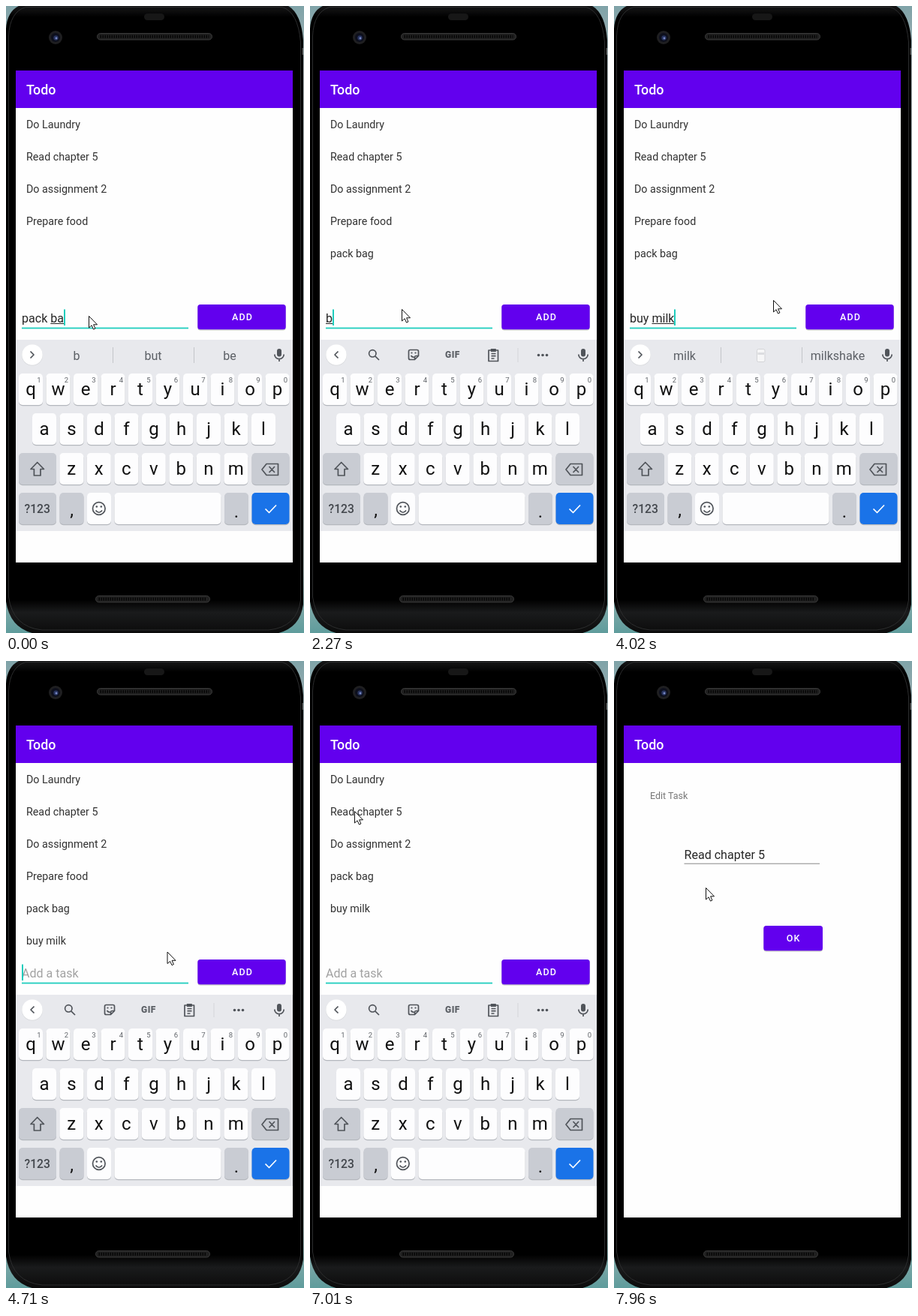
An HTML page that plays this animation: 397x836 px, repeating every 8000 ms.

```html
<!DOCTYPE html>
<html lang="en">
<head>
<meta charset="utf-8">
<title>Todo list</title>
<style>
  html, body { margin: 0; width: 100%; height: 100%; overflow: hidden; background: #000; }
  svg { display: block; width: 100%; height: 100%; }
  text { font-family: Roboto, sans-serif; white-space: pre; }
  .item { font-size: 14.29px; fill: #323232; }
  .input { font-size: 16.07px; fill: #262626; }
  .button { font-size: 12.5px; font-weight: 500; letter-spacing: 1.12px; fill: #fff; }
  .key { font-size: 24px; fill: #111; text-anchor: middle; }
  .digit { font-size: 9.5px; fill: #5f6368; text-anchor: middle; }
  .word { font-size: 16.07px; fill: #5c6066; text-anchor: middle; }
  .icon { fill: none; stroke: #50545a; stroke-width: 1.7; stroke-linejoin: round; }
</style>
</head>
<body>
<svg id="stage" viewBox="0 0 397 836" preserveAspectRatio="none"></svg>
<script>
const LOOP = 8000;
const PURPLE = '#6200ee', TEAL = '#1fcdbd', KEY = '#fdfdfe', GREY_KEY = '#c9ccd3';

const rect = (x, y, w, h, fill, more = '') =>
  `<rect x="${x}" y="${y}" width="${w}" height="${h}" fill="${fill}" ${more}/>`;
const text = (x, y, cls, str, more = '') => `<text x="${x}" y="${y}" class="${cls}" ${more}>${str}</text>`;
const icon = (d, more = '') => `<path class="icon" d="${d}" ${more}/>`;
const dot = (x, y, r, fill, more = '') => `<circle cx="${x}" cy="${y}" r="${r}" fill="${fill}" ${more}/>`;

const keyCap = (x, y, w, fill = KEY) =>
  rect(x, y + 1.2, w, 42, '#b4b7bd', 'rx="5"') + rect(x, y, w, 42, fill, 'rx="5"');

const letterRow = (letters, cx, y, digits) => [...letters].map((c, i) => {
  const x = cx + 36.5 * i;
  return keyCap(x - 16, y, 32) + text(x, y + 28.5, 'key', c) +
    (digits ? text(x + 11, y + 11.5, 'digit', (i + 1) % 10) : '');
}).join('');

const grille = (x, y, w) =>
  rect(x, y, w, 8.5, '#202020', 'rx="4.2" stroke="#3b3b3b"') +
  `<path d="M${x + 4} ${y + 4.2}H${x + w - 4}" stroke="#050505" stroke-width="4" stroke-dasharray="1.5 1.5"/>`;

const phone = () => `
  ${rect(0, 0, 397, 836, 'url(#backdrop)')}
  <path d="M0 30Q2 4 22 -2H372Q393 6 396 46V798Q391 834 352 838H46Q6 834 0 794Z" fill="url(#body)"/>
  <path d="M3.500 40Q5 8 26 1.500H368Q389 8 392.500 48V792Q388 828 350 832H48Q9 828 3.500 788Z"
    fill="none" stroke="#2c2d2e"/>
  ${rect(394.5, 56, 1.5, 9, '#555')}
  ${rect(184, 10, 27, 9, '#171717', 'rx="4.500"')}
  ${dot(66, 42, 9, '#1f1f21')}${dot(66, 42, 6, '#0d0f1c')}${dot(66.5, 42.5, 3.2, '#28345f')}${dot(67, 43, 1.4, '#7888c4')}
  ${grille(121.5, 36.5, 153)}${grille(119.5, 786.5, 152)}
  ${rect(13, 86, 369, 656, '#fefefe')}`;

const appBar = () => rect(13, 86, 369, 50, PURPLE) +
  text(27, 117.7, 'title', 'Todo', 'fill="#fff" font-size="17.86" font-weight="500"');

const mic = () => `<rect x="361" y="457" width="6" height="10.500" rx="3" fill="#50545a"/>` +
  icon('M357.800 464.500a6.200 6.200 0 0 0 12.400 0M364 470.500V474');

const toolbar = () => `
  ${icon('M37.500 460.500L33 465L37.500 469.500')}
  <circle class="icon" cx="83.300" cy="463.300" r="4.700"/>${icon('M86.800 466.800L92 472', 'stroke-width="2.100"')}
  ${icon('M139.500 471.500H133.500Q131.500 471.500 131.500 469.500V460.500Q131.500 458.500 133.500 458.500H142.500Q144.500 458.500 144.500 460.500V466.500ZM139.500 471.500V468.500Q139.500 466.500 141.500 466.500H144.500M134.500 466Q136 468.500 138.500 468')}
  ${dot(135.5, 462.5, 1.1, '#50545a')}${dot(140.5, 462.5, 1.1, '#50545a')}
  ${text(190, 469.3, 'word', 'GIF', 'style="font-size:12px;font-weight:900;letter-spacing:.5px"')}
  ${icon('M238 459H250.500V473.500H238ZM241.500 463.500H247.500M241.500 466.700H247.500M241.500 470H245.500')}
  ${rect(240.8, 457, 7, 4, '#50545a')}
  ${rect(276.5, 456, 1, 19, '#d3d5d9')}
  ${[304.5, 310, 315.5].map(x => dot(x, 465.5, 1.8, '#50545a')).join('')}`;

const suggestions = () => `
  ${icon('M32.500 460.500L37 465L32.500 469.500')}
  ${rect(142, 455, 1, 21, '#c3c5c9')}${rect(250, 455, 1, 21, '#c3c5c9')}
  ${[94, 196, 298].map((x, i) => text(x, 471.5, 'word', '', `id="word${i}"`)).join('')}
  <g id="glass">${rect(190.5, 457.5, 10.5, 17, '#f6f6f7', 'rx="2" stroke="#d3d4d7"')}
  ${rect(191.5, 462, 8.5, 3, '#dcdde0')}</g>`;

const keyboard = () => `
  ${rect(13, 445, 369, 255, '#e8e9ed')}
  ${dot(35, 465.6, 14, '#d5d7da')}${dot(35, 465, 13.7, '#fff')}
  <g id="toolbar">${toolbar()}</g><g id="suggestions">${suggestions()}</g>${mic()}
  ${letterRow('qwertyuiop', 33, 490, true)}
  ${letterRow('asdfghjkl', 51, 543)}
  ${letterRow('zxcvbnm', 87.3, 596)}
  ${keyCap(17, 596, 50, GREY_KEY)}${icon('M41.700 608.500L50.500 617.500H46V626H37.400V617.500H33Z')}
  ${keyCap(327.5, 596, 50, GREY_KEY)}
  ${icon('M341 618L347 610.500H362.500V625.500H347ZM350.500 614L358 622M358 614L350.500 622')}
  ${keyCap(17, 649, 50, GREY_KEY)}
  ${text(41.7, 675.7, 'key', '?123', 'style="font-size:15.700px;font-weight:500;fill:#44484e"')}
  ${keyCap(71.5, 649, 32, GREY_KEY)}${text(87.5, 680, 'key', ',')}
  ${keyCap(108, 649, 32)}
  <circle class="icon" cx="123.800" cy="670" r="8.300"/>${icon('M119.500 672.500Q123.800 678 128.100 672.500')}
  ${dot(120.8, 667.5, 1.3, '#50545a')}${dot(126.8, 667.5, 1.3, '#50545a')}
  ${keyCap(144.5, 649, 142)}
  ${keyCap(291, 649, 32, GREY_KEY)}${text(307, 682, 'key', '.')}
  ${keyCap(327.5, 649, 50, '#1a73e8')}${icon('M345.500 670.500L350.500 675.500L360 665.500', 'style="stroke:#fff"')}`;

const button = (x, y, w, label, tx, inner = '') =>
  rect(x, y + 1, w, 33.5, '#000', 'rx="3.500" opacity=".22"') +
  rect(x, y, w, 33.3, PURPLE, 'rx="3.500"') + inner + text(tx, y + 21.4, 'button', label);

const listPage = () => `
  ${[0, 1, 2, 3, 4, 5].map(i => text(27, 163 + 43 * i, 'item', '', `id="item${i}"`)).join('')}
  ${rect(21, 428.6, 222, 1.8, TEAL)}
  ${text(21, 421.7, 'input', '', 'id="field"')}
  <rect id="compose" y="423" height="1" fill="#262626"/>
  <rect id="caret" y="404.500" width="2" height="21.500" fill="${TEAL}"/>
  <rect id="lift" x="255" y="399" width="118" height="34" rx="4" fill="#000" opacity=".35" filter="url(#soft)"/>
  ${button(255.3, 398, 117.4, 'ADD', 301,
    '<circle id="ripple" cx="271" cy="414" r="100" fill="#8a3bf0" clip-path="url(#addClip)"/>')}
  ${keyboard()}`;

const editPage = () => rect(13, 136, 369, 606, '#fefefe') +
  text(48, 184, 'label', 'Edit Task', 'font-size="12.500" fill="#777"') +
  text(93.5, 264, 'input', 'Read chapter 5') + rect(93.5, 269.7, 180.5, 1, '#888') +
  button(199.3, 353, 78.7, 'OK', 229.7);

document.getElementById('stage').innerHTML = `
  <defs>
    <linearGradient id="backdrop" x2="0" y2="1">
      <stop stop-color="#7fa3a8"/><stop offset=".1" stop-color="#a9b2b5"/>
      <stop offset=".9" stop-color="#a9b8b8"/><stop offset="1" stop-color="#5f9c9c"/>
    </linearGradient>
    <linearGradient id="body" x2="0" y2="1">
      <stop stop-color="#1b1b1c"/><stop offset=".02" stop-color="#000"/>
      <stop offset=".945" stop-color="#000"/><stop offset=".965" stop-color="#1a1b1c"/><stop offset="1" stop-color="#0a0a0a"/>
    </linearGradient>
    <filter id="soft" x="-10%" y="-30%" width="120%" height="160%"><feGaussianBlur stdDeviation="2"/></filter>
    <clipPath id="addClip"><rect x="255.300" y="398" width="117.400" height="33.300" rx="3.500"/></clipPath>
    <clipPath id="screenClip"><rect x="13" y="136" width="369" height="606"/></clipPath>
  </defs>
  ${phone()}
  <g id="list">${listPage()}</g>
  <g clip-path="url(#screenClip)"><g id="edit">${editPage()}</g></g>
  ${appBar()}
  <path id="mouse" d="M0 0V15.500L3.600 12.300L6 17.600L8.400 16.500L6.100 11.300H11Z" fill="#fff" stroke="#111" stroke-linejoin="round"/>`;

const el = {};
document.querySelectorAll('svg [id]').forEach(n => el[n.id] = n);
const set = (node, attrs) => { for (const k in attrs) node.setAttribute(k, attrs[k]); };
const show = (node, on) => set(node, { visibility: on ? 'inherit' : 'hidden' });

const tasks = ['Do Laundry', 'Read chapter 5', 'Do assignment 2', 'Prepare food'];
const packed = [...tasks, 'pack bag'], full = [...packed, 'buy milk'];
const left = full.filter(s => s !== 'Prepare food');

// Each step changes part of the state and holds until the next one.
const steps = [
  [0, { tasks, typed: 'pack ba', words: 'b but be', mouse: [110.5, 413.5], caret: 1, press: 0, edit: 0 }],
  [300, { typed: 'pack bag' }],
  [450, { words: 'bag bags baggage' }],
  [760, { mouse: [160, 409] }],
  [910, { mouse: [225, 407] }],
  [1060, { mouse: [269.5, 410.5] }],
  [1300, { typed: '', press: 1 }],
  [1420, { tasks: packed, words: '', press: .4 }],
  [1560, { press: 0, mouse: [122.5, 404.5] }],
  [1840, { caret: 0 }],
  [2270, { typed: 'b', caret: 1 }],
  [2420, { typed: 'bu', words: 'b but be' }],
  [2570, { typed: 'buy', words: 'but by bus' }],
  [2720, { words: 'buy but buying' }],
  [2870, { typed: 'buy ' }],
  [3020, { typed: 'buy m', words: 'the it a' }],
  [3170, { typed: 'buy mi', words: 'my me more' }],
  [3320, { typed: 'buy mil', words: 'mi mind mine' }],
  [3490, { typed: 'buy milk', words: 'mil milk mild' }],
  [3640, { words: 'milk * milkshake' }],
  [4020, { mouse: [212.5, 392.5] }],
  [4140, { mouse: [250, 402] }],
  [4290, { mouse: [270.5, 409.5] }],
  [4440, { typed: '', press: 1 }],
  [4560, { tasks: full, words: '', press: .4 }],
  [4710, { press: 0, mouse: [215, 388] }],
  [4830, { mouse: [120, 348] }],
  [4980, { mouse: [66.5, 321.5] }],
  [5130, { mouse: [66.5, 297], caret: 0 }],
  [5280, { mouse: [65.5, 279.5] }],
  [5570, { caret: 1 }],
  [5990, { caret: 0 }],
  [6270, { tasks: left }],
  [6580, { caret: 1 }],
  [6700, { mouse: [64.5, 258] }],
  [6870, { mouse: [61.5, 222] }],
  [7010, { mouse: [59.5, 200.5], caret: 0 }],
  [7660, { edit: .6 }],
  [7810, { edit: 1, mouse: [92, 255] }],
  [7960, { mouse: [122.5, 302.5] }]
];

const pen = document.createElement('canvas').getContext('2d');
const widthOf = str => { pen.font = '16.07px Roboto, sans-serif'; return pen.measureText(str).width; };

function drawField({ typed, caret }) {
  el.field.textContent = typed || 'Add a task';
  el.field.style.fill = typed ? '' : '#a2a2a2';
  const end = typed.trimEnd();
  const start = widthOf(end.slice(0, end.lastIndexOf(' ') + 1));
  set(el.compose, { x: 21 + start, width: widthOf(end) - start });
  set(el.caret, { x: Math.round(21 + widthOf(typed)) });
  show(el.caret, caret);
}

function drawWords(words) {
  show(el.toolbar, !words);
  show(el.suggestions, words);
  const list = words.split(' ');
  [0, 1, 2].forEach(i => el['word' + i].textContent = list[i] === '*' ? '' : list[i] || '');
  show(el.glass, list[1] === '*');
}

function draw(t) {
  const s = Object.assign({}, ...steps.filter(step => step[0] <= t).map(step => step[1]));
  for (let i = 0; i < 6; i++) el['item' + i].textContent = s.tasks[i] || '';
  drawField(s);
  drawWords(s.words);
  set(el.ripple, { opacity: s.press });
  set(el.lift, { opacity: .35 * s.press });
  show(el.list, s.edit < 1);
  show(el.edit, s.edit > 0);
  set(el.edit, { opacity: s.edit, transform: `translate(0 ${(1 - s.edit) * 40})` });
  set(el.mouse, { transform: `translate(${s.mouse})` });
}

const origin = performance.now();
function tick() {
  draw((performance.now() - origin) % LOOP);
  requestAnimationFrame(tick);
}
tick();
</script>
</body>
</html>
```
